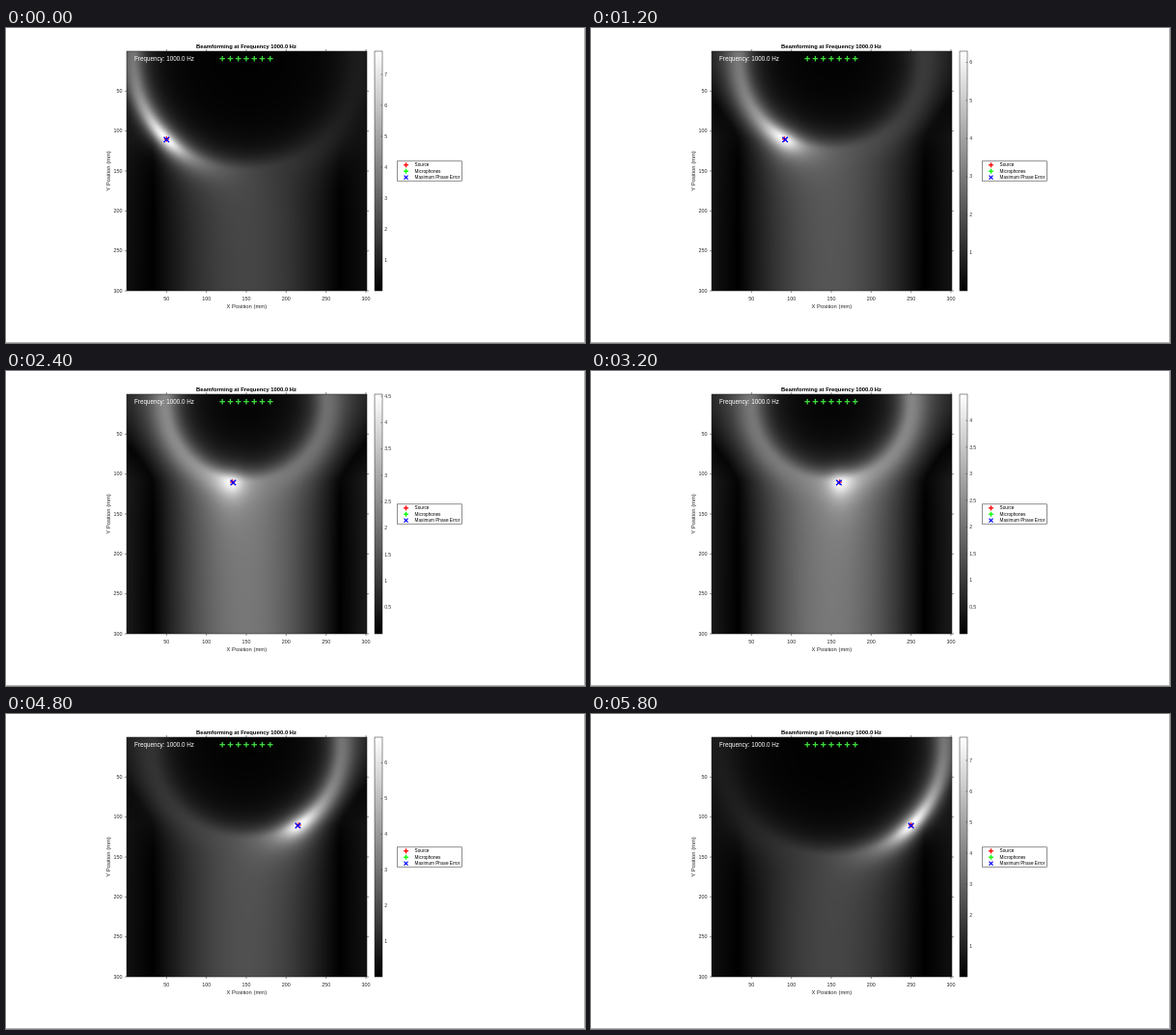
These frames come from a looping animation (600 by 326 pixels, 6 s). An HTML page with a canvas:

```html
<!DOCTYPE html>
<html lang="en">
<head>
<meta charset="utf-8">
<title>Beamforming sweep</title>
<style>
  html, body { margin: 0; width: 100%; height: 100%; overflow: hidden; background: #fff; }
  canvas { display: block; width: 600px; height: 326px; }
</style>
</head>
<body>
<canvas id="stage" width="600" height="326"></canvas>
<script>
const ctx = document.getElementById('stage').getContext('2d');
const LEFT = 125, TOP = 24, W = 249, H = 248, SCALE = 248 / 300;
const STEPS = 30, STEP_MS = 200;
const FONT = '"Liberation Sans", Arial, sans-serif';
const MIC = { x: 150, y: 10 }, EMIT_Y = 110;
const FLOOR = 2.1;

// Peak level against the emitter's sideways offset from the array
const PEAKS = [[0, 4.45], [16.6, 4.52], [37.9, 5.15], [44.8, 5.44], [65.5, 6.72], [72.4, 7.3], [100, 7.75]];

const px = x => LEFT + x * SCALE;
const py = y => TOP + y * SCALE;
const clamp = v => Math.max(0, Math.min(1, v));

function peakAt(d) {
  let i = 1;
  while (i < PEAKS.length - 1 && d > PEAKS[i][0]) i++;
  const [d0, v0] = PEAKS[i - 1], [d1, v1] = PEAKS[i];
  return v0 + (v1 - v0) * (d - d0) / (d1 - d0);
}

// Returns the beam level as a function of position in mm
function makeField(emitX) {
  const off = emitX - MIC.x, d = Math.abs(off), side = off < 0 ? -1 : 1;
  const peak = peakAt(d);
  const depth = EMIT_Y - MIC.y;
  const r0 = Math.hypot(d, depth), emitAngle = Math.atan2(d, depth);
  const near = 2.2 + 0.009 * d, far = 2.2 - 0.014 * d;
  const sigmaIn = 12 + 0.15 * d, sigmaOut = 18 + 0.2 * d;

  return (x, y) => {
    const dx = x - MIC.x, dy = y - MIC.y;
    const t = Math.hypot(dx, dy) - r0;

    // Level along the circular ridge through the emitter
    const angle = Math.atan2(side * dx, dy);
    const k = clamp(angle / 2.4 + 0.5);
    const base = far + (near - far) * k * k * (3 - 2 * k);
    const arc = (angle - emitAngle) * r0;
    const sigma = arc < 0 ? sigmaIn : sigmaOut;
    const ridge = base + (peak - base) / (1 + (arc / sigma) ** 2);
    const width = 18 * Math.sqrt(2.2 / ridge) * (t > 0 ? 1.5 : 1);
    const fall = 1 / (1 + (t / width) ** 2);
    if (t <= 0) return ridge * fall;

    // Vertical band below, with dark lines bending outwards above
    const rise = Math.max(0, EMIT_Y - y);
    const zero = 117 + 0.4 * rise + 0.006 * rise * rise;
    const wave = Math.cos(Math.PI / 2 * dx / zero);
    const band = wave < 0 ? -wave * 0.5 : wave;
    const floor = FLOOR * band * (1 - 0.005 * rise);
    return ridge * fall * (band + (1 - band) * fall) + floor * (1 - fall);
  };
}

function drawField(emitX, peak) {
  const img = ctx.createImageData(W, H), field = makeField(emitX);
  for (let j = 0, p = 0; j < H; j++) {
    for (let i = 0; i < W; i++, p += 4) {
      const v = 255 * clamp(field((i + 0.5) / SCALE, (j + 0.5) / SCALE) / peak);
      img.data[p] = img.data[p + 1] = img.data[p + 2] = v;
      img.data[p + 3] = 255;
    }
  }
  ctx.putImageData(img, LEFT, TOP);
}

function text(str, x, y, size, align = 'left', color = '#262626', weight = '') {
  ctx.font = `${weight} ${size}px ${FONT}`;
  ctx.textAlign = align;
  ctx.textBaseline = 'middle';
  ctx.fillStyle = color;
  ctx.fillText(str, x, y);
}

function line(x1, y1, x2, y2, color = '#262626', width = 0.5) {
  ctx.strokeStyle = color;
  ctx.lineWidth = width;
  ctx.beginPath();
  ctx.moveTo(x1, y1);
  ctx.lineTo(x2, y2);
  ctx.stroke();
}

function plus(x, y, color, r = 2.8) {
  line(x - r, y, x + r, y, color, 1.3);
  line(x, y - r, x, y + r, color, 1.3);
}

function cross(x, y, r) {
  line(x - r, y - r, x + r, y + r, '#00f', 1.3);
  line(x - r, y + r, x + r, y - r, '#00f', 1.3);
}

function drawAxes() {
  const right = LEFT + W, bottom = TOP + H;
  ctx.strokeStyle = '#262626';
  ctx.lineWidth = 0.5;
  ctx.strokeRect(LEFT, TOP, W, H);
  for (let v = 50; v <= 300; v += 50) {
    line(LEFT - 2, py(v), LEFT, py(v));
    line(right, py(v), right + 2, py(v));
    line(px(v), bottom, px(v), bottom + 2);
    line(px(v), TOP - 2, px(v), TOP);
    text(v, 120.5, py(v) + 0.3, 5.4, 'right');
    text(v, px(v), 280.5, 5.4, 'center');
  }
  text('X Position (mm)', 249.3, 288.3, 5.85, 'center');
  ctx.save();
  ctx.translate(106.7, 148);
  ctx.rotate(-Math.PI / 2);
  text('Y Position (mm)', 0, 0, 5.85, 'center');
  ctx.restore();
  text('Beamforming at Frequency 1000.0 Hz', 249, 19.7, 5.85, 'center', '#000', 'bold');
}

function drawColorbar(peak) {
  const ramp = ctx.createLinearGradient(0, TOP, 0, TOP + H);
  ramp.addColorStop(0, '#fff');
  ramp.addColorStop(1, '#000');
  ctx.fillStyle = ramp;
  ctx.fillRect(382, TOP, 8, H);
  ctx.strokeStyle = '#262626';
  ctx.lineWidth = 0.5;
  ctx.strokeRect(382, TOP, 8, H);
  const step = peak < 6 ? 0.5 : 1;
  for (let v = step; v <= peak; v += step) {
    const y = TOP + H * (1 - v / peak);
    line(388.5, y, 390, y);
    text(v, 392.2, y + 0.3, 5);
  }
}

function drawLegend() {
  ctx.strokeStyle = '#444';
  ctx.lineWidth = 0.6;
  ctx.strokeRect(405.3, 137.8, 67.2, 20.4);
  plus(414.5, 141.8, '#f00', 2.5);
  plus(414.5, 148.2, '#0f0', 2.5);
  cross(414.5, 154.6, 2);
  ['Source', 'Microphones', 'Maximum Phase Error'].forEach((s, i) =>
    text(s, 423.6, 142.1 + i * 6.35, 4.7, 'left', '#000'));
}

function draw(step) {
  const emitX = 50 + 200 * step / (STEPS - 1);
  const off = emitX - MIC.x, peak = peakAt(Math.abs(off));
  ctx.fillStyle = '#fff';
  ctx.fillRect(0, 0, 600, 326);
  ctx.fillStyle = '#b4b4b4';
  ctx.fillRect(0, 325, 600, 1);
  ctx.fillRect(599, 0, 1, 326);

  drawField(emitX, peak);
  drawAxes();
  drawColorbar(peak);
  drawLegend();
  text('Frequency: 1000.0 Hz', 133, 32, 6.3, 'left', '#fff');
  for (let x = 120; x <= 180; x += 10) plus(px(x), 31.7, '#3fdc3f');

  const shift = Math.abs(off) < 90 ? -0.8 * Math.sign(off) : 0;
  plus(px(emitX), py(EMIT_Y), '#f00', 2.6);
  cross(px(emitX + shift), py(EMIT_Y + 0.7), 2.8);
}

let start = null, shown = -1;
function tick(now) {
  if (start === null) start = now;
  const step = Math.floor((now - start) / STEP_MS) % STEPS;
  if (step !== shown) draw(shown = step);
  requestAnimationFrame(tick);
}
draw(0);
requestAnimationFrame(tick);
</script>
</body>
</html>
```
